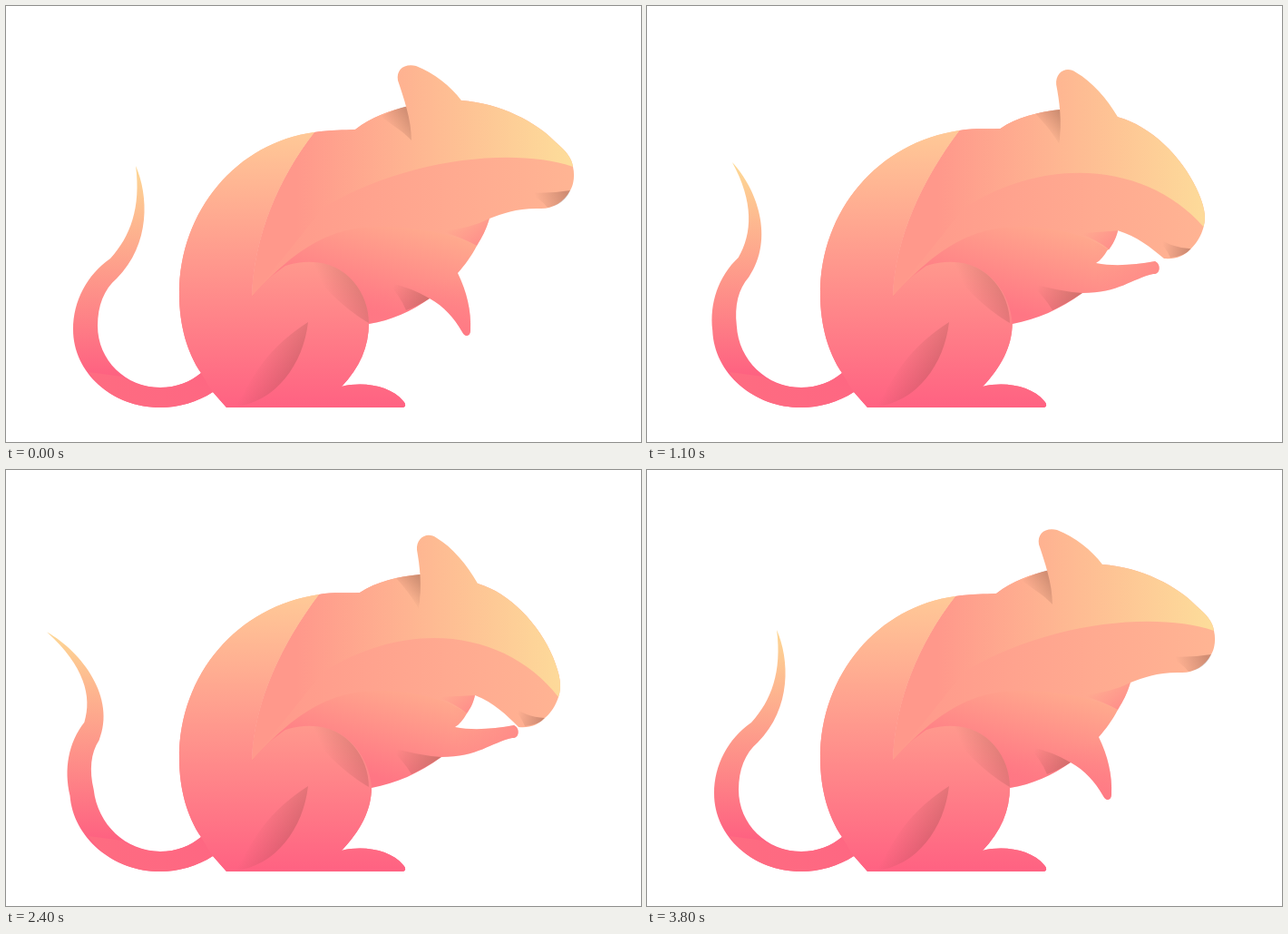
Animation of 700 by 480 pixels, one loop 4400 ms. Source, as an HTML page with a canvas:

```html
<!DOCTYPE html>
<html lang="en">
<head>
<meta charset="utf-8">
<title>Nibbling mouse</title>
<style>
  html, body { margin: 0; width: 700px; height: 480px; overflow: hidden; background: #fff; }
  canvas { display: block; }
</style>
</head>
<body>
<canvas id="stage" width="700" height="480"></canvas>
<script>
const ctx = document.getElementById('stage').getContext('2d');
const STEP = 100, LOOP = 4400;
const SKIN = ['#ff988b', '#fddc9a'];
const shade = alpha => [`rgba(110,60,50,${alpha})`, 'rgba(110,60,50,0)'];

// Moves every "x y" pair from one pose to the other along a shallow arc.
function morph(from, to, k, bend) {
  const end = to.match(/\d+/g), arc = bend * k * (1 - k);
  let i = 0;
  return from.replace(/(\d+) (\d+)/g, (_, x, y) => {
    const dx = end[i++] - x, dy = end[i++] - y;
    return `${+x + dx * k + dy * arc} ${+y + dy * k - dx * arc}`;
  });
}

// Bends the tail around its lower curve, most at the tip.
function bendTail(path, angle) {
  return path.replace(/(\d+) (\d+)/g, (_, x, y) => {
    const a = angle * Math.max(0, (400 - y) / 224);
    const dx = x - 100, dy = y - 398, c = Math.cos(a), s = Math.sin(a);
    return `${100 + dx * c + dy * s} ${398 + dy * c - dx * s}`;
  });
}

function paint(path, line, colors) {
  const gradient = ctx.createLinearGradient(...line.split(' '));
  colors.forEach((color, i) => gradient.addColorStop(i, color));
  ctx.fillStyle = gradient;
  ctx.fill(new Path2D(path));
}

const tail = 'M143 176 C157 208 160 262 122 300 C108 312 101 330 101 352 C101 390 132 420 170 420 ' +
  'C188 420 203 414 215 404 L245 425 L228 425 C211 436 190 442 170 442 C117 442 74 404 74 356 ' +
  'C74 325 89 296 115 278 C137 254 149 222 143 176Z';
const tailBase = 'M91 403 L128 408 C140 416 155 420 170 420 C188 420 203 414 215 404 L245 425 L228 425 ' +
  'C211 436 190 442 170 442 C136 442 107 427 91 403Z';
const thighShade = 'M308 286 C368 268 400 312 400 349 C385 340 358 322 330 283Z';
const legShade = 'M333 348 C328 394 297 437 252 441 C267 425 275 385 333 348Z';

// Each pair holds the upright pose and the eating pose.
const back = [
  'C273 255 300 190 340 139 C360 136 372 137 385 136 C403 122 423 115 445 110 L502 104 ' +
    'C545 107 585 128 606 150 C618 160 624 168 625 177 ',
  'C273 255 305 190 345 137 C362 134 376 136 390 135 C408 123 433 117 457 115 L520 125 ' +
    'C555 135 588 170 603 206 C611 226 613 238 609 250 '];
const torso = [
  'M271 320 ' + back[0] + 'C628 190 624 200 622 203 C615 216 603 223 590 223 ' +
    'C565 222 548 228 533 234 C529 247 525 254 519 264 L400 320Z',
  'M271 320 ' + back[1] + 'C606 259 601 267 594 273 C586 281 578 284 565 283 ' +
    'C552 270 538 256 517 248 C515 257 512 262 508 268 L400 320Z'];
const crown = [
  'M271 320 ' + back[0] + 'C560 155 440 168 350 222Z',
  'M271 320 ' + back[1] + 'C555 180 450 160 350 222Z'];
const ear = [
  'M447 148 C447 125 438 100 432 82 C430 70 439 63 452 66 C472 74 490 88 502 104Z',
  'M455 153 C459 128 456 105 453 88 C452 74 465 67 475 75 C492 85 508 104 520 125Z'];
const earShade = [
  'M443 110 C446 122 447 135 447 148 C440 140 425 130 413 122 C423 116 433 112 443 110Z',
  'M457 115 C458 128 457 140 455 153 C450 143 440 130 430 119 C438 117 447 116 457 115Z'];
const mouth = [
  'M572 205 Q598 207 622 203 Q615 219 597 222 Q590 212 572 205Z',
  'M556 258 Q572 272 594 273 Q587 281 572 282 Q567 270 556 258Z'];
const chest = [
  'M533 234 C529 247 525 254 519 264 Q503 255 480 248 Q512 245 533 234Z',
  'M517 248 C515 257 512 262 508 268 Q495 257 475 250 Q500 249 517 248Z'];
const arm = [
  'M271 320 C300 290 340 243 410 243 C450 243 490 250 519 264 C512 277 506 285 498 294 ' +
    'C508 315 513 335 512 357 C512 364 506 365 503 359 C494 343 483 331 467 322 ' +
    'C447 336 425 346 400 350 L300 350Z',
  'M271 320 C300 290 340 243 410 243 C450 243 485 252 508 268 C504 275 500 280 495 283 ' +
    'C515 287 538 285 560 281 C567 284 566 296 558 295 C535 300 520 316 480 316 ' +
    'C455 334 430 345 403 350 L300 350Z'];
const bellyShade = [
  'M420 304 Q447 310 467 322 Q453 331 441 335 Q434 318 420 304Z',
  'M420 304 Q452 314 480 316 Q462 328 447 335 Q437 318 420 304Z'];
const body = [
  'M340 139 C255 150 191 225 191 317 C191 352 200 382 215 404 L228 425 L243 442 L437 442 ' +
    'C441 442 441 438 438 435 C424 418 394 413 370 419 C390 398 400 375 400 349 ' +
    'C400 312 368 268 308 286 C295 295 283 305 271 320 C273 255 300 190 340 139Z',
  'M345 137 C255 150 191 225 191 317 C191 352 200 382 215 404 L228 425 L243 442 L437 442 ' +
    'C441 442 441 438 438 435 C424 418 394 413 370 419 C390 398 403 375 403 349 ' +
    'C400 312 368 268 308 286 C295 295 283 305 271 320 C273 255 305 190 345 137Z'];

// 0 is upright, 1 is bent down to the paw.
function poseAt(step) {
  if (step === 0 || step > 37) return { head: 0, reach: 0 };
  if (step === 1 || step === 37) return { head: .5, reach: .5 };
  return { head: step % 2 ? .9 : 1, reach: 1 };
}

function tailAngle(step) {
  const start = step < 15 ? 6 : 21;
  const k = (step - start) / 6;
  return k > 0 && k < 1 ? Math.sin(Math.PI * k) * .436 : 0;
}

function draw(step) {
  const { head, reach } = poseAt(step);
  const byHead = pair => morph(...pair, head, .45);
  const byArm = pair => morph(...pair, reach, -.36);
  const paintBody = () => paint(byHead(body), '0 139 0 441', ['#ffc997', '#ff6282']);
  ctx.clearRect(0, 0, 700, 480);

  paint(bendTail(tail, tailAngle(step)), '0 176 0 405', ['#fdd895', '#fe6281']);
  paint(tailBase, '91 0 228 0', ['#fe6c81', '#fe6782']);

  paintBody(); // keeps white from showing through the seams
  paint(byHead(torso), '270 0 620 0', ['#ff988b', '#ffb493']);
  paint(byHead(crown), '320 0 620 0', SKIN);
  paint(byHead(earShade), byHead(['446 114 420 132', '458 118 438 136']), shade(.36));
  paint(byHead(ear), '320 0 620 0', SKIN);
  paint(byHead(mouth), byHead(['617 203 584 212', '591 273 564 268']), shade(.33));
  paint(byHead(chest), byHead(['500 236 522 264', '488 243 510 268']),
    ['rgba(255,134,136,0)', 'rgba(255,134,136,.8)']);

  const limb = byArm(arm);
  paint(limb, '480 245 450 350', ['#ffac8e', '#ff7684']);
  paint(limb, byArm(['500 300 507 362', '495 294 566 289']),
    ['rgba(255,124,133,0)', 'rgba(255,124,133,.6)']);
  paint(byArm(bellyShade), byArm(['464 326 426 312', '474 324 430 310']), shade(.3));

  paintBody();
  paint(thighShade, '394 308 356 324', shade(.23));
  paint(legShade, '318 402 280 384', shade(.24));
}

function tick(now) {
  draw(Math.floor(now % LOOP / STEP));
  requestAnimationFrame(tick);
}
tick(performance.now());
</script>
</body>
</html>
```
